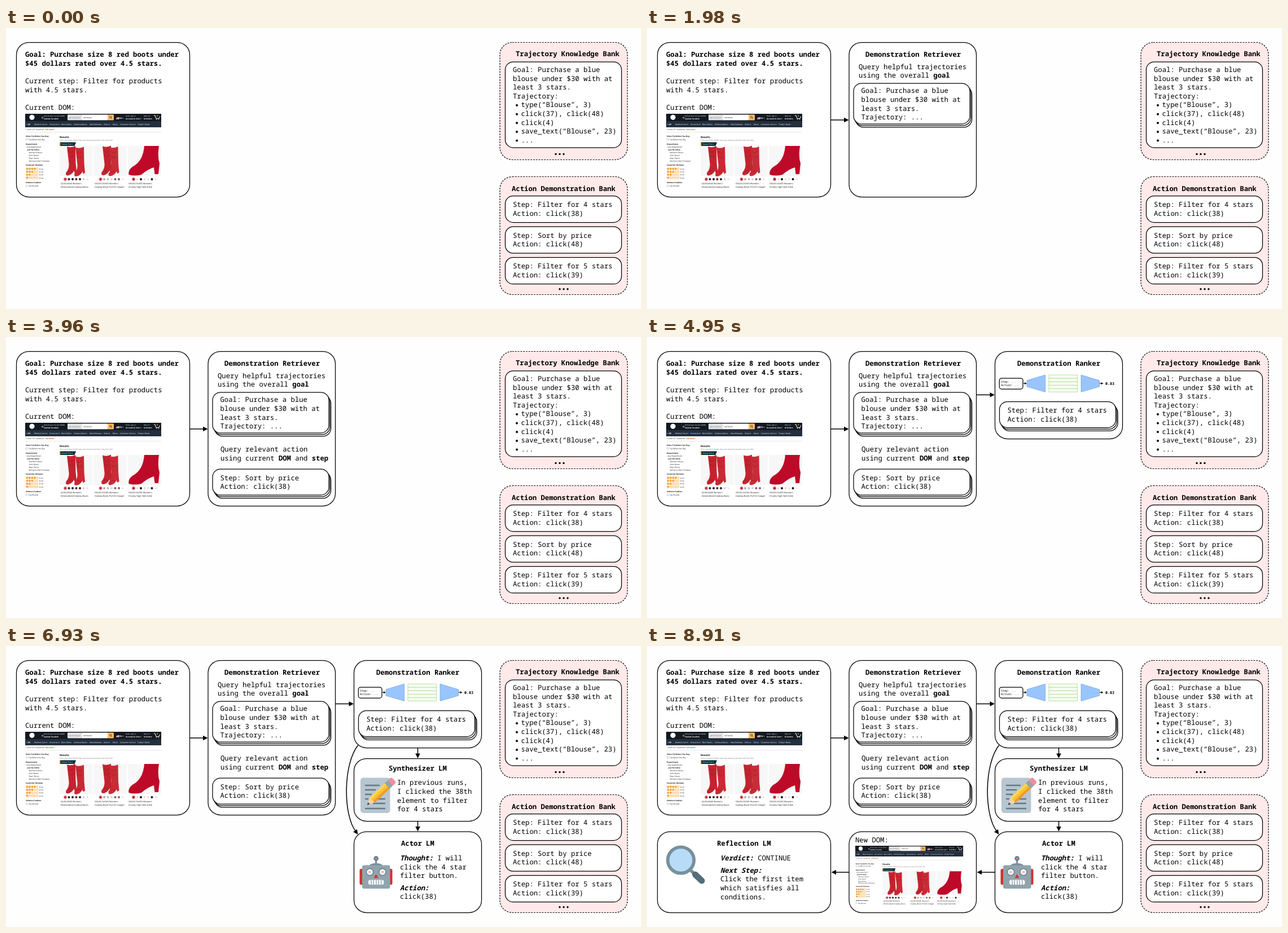
An HTML page that plays this animation: 1125 px wide and 498 px high, repeating every 9900 ms.

```html
<!DOCTYPE html>
<html lang="en">
<head>
<meta charset="utf-8">
<style>
  html, body { margin: 0; height: 100%; overflow: hidden; background: #fefefe; }
  svg { display: block; width: 100vw; height: 100vh; }
  text { font: 12.25px "Noto Sans Mono", monospace; white-space: pre; text-rendering: geometricPrecision; }
  .b { font-weight: 700; }
  .i { font-weight: 700; font-style: italic; }
  .shop text { font-family: "Open Sans", sans-serif; font-weight: 500; }
</style>
</head>
<body>
<svg id="stage" viewBox="0 0 1125 498"></svg>
<script>
const STEP = 990, STEPS = 10;
const LINE = 15.65;

// Shapes
const rect = (x, y, w, h, fill, r = 0, extra = '') =>
  `<rect x="${x}" y="${y}" width="${w}" height="${h}" rx="${r}" fill="${fill}" ${extra}/>`;
const circle = (x, y, r, fill, extra = '') =>
  `<circle cx="${x}" cy="${y}" r="${r}" fill="${fill}" ${extra}/>`;
const path = (d, fill = 'none', stroke = 'none', width = 1, extra = '') =>
  `<path d="${d}" fill="${fill}" stroke="${stroke}" stroke-width="${width}" ${extra}/>`;
const box = (x, y, right, bottom, r = 22) =>
  rect(x, y, right - x, bottom - y, '#fff', r, 'stroke="#000" stroke-width="1.25"');
const stack = (x, y, right, bottom) => [2, 1, 0].map(k =>
  box(x + k * 1.8, y + k * 2.9, right + k * 1.8, bottom + k * 2.9, 14)).join('');
const bank = (y, bottom) => rect(875, y, 226, bottom - y, '#ffe9e9', 22,
  'stroke="#000" stroke-width="1.2" stroke-dasharray="2.8 2"');
const dots = (x, y) => [-7, 0, 7].map(d => circle(x + d, y, 1.7, '#000')).join('');

// Text: y is the middle of the first line, | breaks lines, *bold*, ^bold italic^
const text = (x, y, s, size = 12.25, gap = LINE, attrs = '') => s.split('|').map((line, k) =>
  `<text x="${x}" y="${y + k * gap + size * .335}" style="font-size:${size}px" ${attrs}>` +
  line.replace(/\*(.+?)\*/g, '<tspan class="b">$1</tspan>')
      .replace(/\^(.+?)\^/g, '<tspan class="i">$1</tspan>') + '</text>').join('');

const arrowHead = (x, y, angle, size = 8.5) =>
  `<path d="M0 0L${-size} ${-size / 2}V${size / 2}Z" transform="translate(${x} ${y}) rotate(${angle})"/>`;
const arrow = (x1, y1, x2, y2, size = 8.5, width = 1.5) => {
  const a = Math.atan2(y2 - y1, x2 - x1);
  const ex = x2 - Math.cos(a) * size / 2, ey = y2 - Math.sin(a) * size / 2;
  return path(`M${x1} ${y1}L${ex} ${ey}`, 'none', '#000', width) +
    arrowHead(x2, y2, a * 180 / Math.PI, size);
};

// Shop page
function shopPage() {
  const small = (x, y, s, size = 3.4, color = '#111') => text(x, y, s, size, 6.3, `fill="${color}"`);
  const white = (x, y, s, size = 3.3) => small(x, y, s, size, '#fff');
  const check = y => rect(35.2, y, 3, 3, '#fff', .5, 'stroke="#888" stroke-width=".4"');
  const star = (x, y, on) => {
    let pts = '';
    for (let k = 0; k < 10; k++) {
      const r = k % 2 ? 1.1 : 2.4, a = (k / 5 - .5) * Math.PI;
      pts += `${x + r * Math.cos(a)},${y + r * Math.sin(a)} `;
    }
    return `<polygon points="${pts}" fill="${on ? '#f59a23' : '#fff'}" stroke="#f59a23" stroke-width=".5"/>`;
  };
  const boot = (x, y, color) =>
    `<g transform="translate(${x} ${y})">` +
    path('M0 1Q7 4 15 0L15.5 30L17 46L13.5 48L12.5 44Q8 52 1 52.5Q-3 52 -1.5 47Q4 41 3.5 32Z', color) +
    path('M3 8Q7 16 11 8M4 16Q8 24 12 16M2 46Q7 42 10 46', 'none', '#8e1420', .6) + '</g>';
  const swatches = (x, colors) => colors.map((c, k) => circle(x + k * 6.5, 268, 2, c)).join('') +
    circle(x, 268, 2.7, 'none', 'stroke="#c33" stroke-width=".6"') + small(x + 37, 268, '+9', 3, '#777');

  let s = rect(34, 152, 242.5, 134, '#fff') + rect(34, 152, 241, 13, '#131921') + rect(34, 165, 241, 11, '#232f3e');
  s += circle(46, 158.3, 4.6, '#fff');
  s += white(67, 156.4, 'Delivering to Corvale 00000', 2.9) + white(67, 160.6, '*Update location*', 3.3);
  s += circle(64.7, 159, 1.2, 'none', 'stroke="#fff" stroke-width=".6"');
  s += rect(109, 153.5, 27, 10, '#e3e3e3', 1) + small(111, 158.5, 'Just for Zelvo ▾', 3, '#555');
  s += rect(135, 153.5, 45, 10, '#fff') + small(137, 158.5, 'red boots');
  s += rect(180, 153.5, 11, 10, '#febd69', 1) + circle(185, 158, 1.7, 'none', 'stroke="#222" stroke-width=".7"') +
    path('M186.2 159.2l1.8 1.8', 'none', '#222', .8);
  s += rect(195, 158, 5.4, 3.6, '#fff') + path('M195 158.5h5.4M195 160h5.4M195 161.3h5.4', 'none', '#c33', .6) +
    rect(195, 158, 2.4, 1.9, '#33498a') + white(201, 159.8, '*EN* ▾');
  s += white(212, 156.4, 'Hello, sign in', 3) + white(212, 160.6, '*Account &amp; Lists* ▾', 3.3);
  s += white(244, 156.4, 'Returns', 3) + white(244, 160.6, '*&amp; Orders*', 3.3);
  s += path('M262 155h2l2 5.5h5l1.5-4', 'none', '#fff', 1) + circle(266.5, 162, .8, '#fff') +
    circle(270.5, 162, .8, '#fff') + small(267, 156, '*0*', 4, '#f59a23');

  const menu = [[36, '≡ *All*'], [50, 'Medical Care ▾'], [77, 'Groceries ▾'], [98, 'Best Sellers'],
    [120, 'Velmora Basics'], [148, 'New Releases'], [173, 'Zelvo ▾'], [189, 'Music'],
    [202, 'Customer Service'], [233, "Today's Deals"]];
  s += menu.map(([x, label]) => white(x, 170.5, label, 3.4)).join('');

  s += small(35, 180, '1-24 of 271 results for <tspan class="b" fill="#c45500">"red boots"</tspan>', 3.2);
  s += path('M34 184.5H275', 'none', '#ddd', .7);

  const side = [[35, 192, '*Zelvo Try Before You Buy*'], [40, 198, 'Try Before You Buy'], [35, 206, '*Department*'],
    [35, 211, '‹ Any Department'], [37.5, 216, '*Just for Zelvo*'], [40.5, 221, "Women's Boots"],
    [40.5, 226, "Girls' Boots"], [40.5, 231, "Boys' Boots"], [40.5, 235.7, "Women's Rain Footwear"],
    [35, 243.3, '*Customer Reviews*'], [35, 274, '*Velmora Fashion*'], [40, 280.2, 'Top Brands']];
  s += side.map(([x, y, label]) => small(x, y, label, 3.3)).join('') + check(196) + check(278.2);
  for (let row = 0; row < 4; row++) {
    const y = 249.6 + row * 5.3;
    for (let k = 0; k < 5; k++) s += star(37.4 + k * 4.5, y, k < 4 - row);
    s += small(59, y, '&amp; Up', 3);
  }

  s += small(95, 193.2, '*Results*', 4.6) +
    small(95, 199, 'Price and other details may vary based on product size and color', 3.15, '#666');
  s += [95, 155.3, 216].map(x => rect(x, 209, 58.5, 53.5, '#f7f7f7')).join('');
  s += path('M95 202.5H124L121.5 209H95Z', '#002f36') + rect(95, 202.5, 1.5, 6.5, '#f59a23') +
    white(98.5, 205.8, 'Overall Pick ▾', 3.2);
  s += boot(108, 209, '#c4222e') + boot(123, 210.5, '#cb2833') + boot(171, 208.5, '#c2242f') + boot(183.5, 210, '#c92c37');
  s += path('M245 209H271Q268 228 272 240L270 259H263.5L262 247Q250 251 240 260Q228 263 217.5 260Q216 252 224 246Q243 236 245 209Z', '#bd0a28');
  s += swatches(105, ['#b9243a', '#222', '#111', '#5a1a20', '#222', '#e6c8c8']);
  s += swatches(167.5, ['#c1121f', '#b5a7a0', '#bbb', '#ddd0dc', '#8a5a6a', '#9a5a50']);
  s += swatches(226, ['#b60a25', '#eee0d8', '#111', '#f0d8dc', '#e9e2ea', '#111']);
  s += small(97, 275.5, "QUOLVANE Women's|Embroidered Cowboy Boots", 3.75);
  s += small(157, 275.5, "OVLEN DUSKS Women's|Cowboy Boots Pull On Cowgirl", 3.75);
  s += small(217, 275.5, "OVLEN DUSKS Women's|Chunky High Heel Ankle", 3.75);
  return `<g id="shop" class="shop">${s}</g>`;
}

// Icons
const memo = () =>
  rect(628, 233.5, 52.5, 62.5, '#b7c6d0', 5) +
  path('M636 247h26M636 255h19M636 263h12M636 271h6M657 271h15M650 279h22M636 288h36', 'none', '#637884', 2.3) +
  '<g transform="translate(639.5 282) rotate(-43.5)">' +
  path('M0 0L14-6.5V6.5Z', '#f3d3a5') + path('M0 0L5-2.3V2.3Z', '#37474f') +
  rect(13, -6.5, 38, 4.4, '#ffd54f') + rect(13, -2.1, 38, 4.3, '#fbc02d') + rect(13, 2.2, 38, 4.3, '#f39c1f') +
  rect(55, -6.5, 10.5, 13, '#ef8f9d', 3.5) + rect(49.5, -6.5, 7.5, 13, '#90a4ae') + '</g>';

const robot = () =>
  rect(626.5, 395, 8, 28, '#d3302f', 2.5) + rect(676.5, 395, 8, 28, '#d3302f', 2.5) +
  rect(654, 378, 3.2, 10, '#78909c') + circle(655.6, 376.5, 4.3, '#607d8b') + circle(655.6, 376.5, 2, '#d98080') +
  path('M643 390Q645 385 655.6 385Q666 385 668 390Z', '#78909c') + rect(631, 388.5, 49.5, 41.5, '#90a4ae', 3.5) +
  [644.5, 667].map(x => circle(x, 400.5, 6, '#fff', 'stroke="#647984" stroke-width="1.4"') + circle(x, 400.5, 2.6, '#e5c6c6')).join('') +
  path('M655.6 404.5L659.6 411H651.6Z', '#d3302f') + rect(642, 414.5, 27.5, 8.5, '#fff', 3.5) +
  path('M647 414.5v8.5M651.4 414.5v8.5M655.8 414.5v8.5M660.2 414.5v8.5M664.6 414.5v8.5', 'none', '#78909c', 1.2);

const magnifier = () =>
  path('M76 396L84 404', 'none', '#78909c', 6) +
  path('M85.5 405L97 416', 'none', '#546e7a', 11, 'stroke-linecap="round"') +
  circle(60, 379.5, 23.2, '#b8dcf8', 'stroke="#78909c" stroke-width="5.8"');

const ranking = () => {
  const blue = d => path(d, '#99c5ff', '#6c9fd6', .7);
  let rows = '';
  for (let k = 0; k < 5; k++) rows += rect(712, 67.2 + k * 6.05, 50.5, 6.05, '#f8fff2', 0, 'stroke="#a9d893" stroke-width=".8"');
  return box(624.3, 73, 666, 92.3, 4) + text(627, 79.3, 'Step: ...|Action: ...', 5, 6.3) +
    arrow(666, 82.2, 673, 82.2, 4, .9) + blue('M673 77L705.5 67.2V97.5L673 88Z') + rows +
    blue('M769 67.2L801.5 77V88L769 97.5Z') + arrow(801.5, 82.2, 808.5, 82.2, 4, .9) + text(812, 82.5, '*0.83*', 6.7);
};

const actions = ['type(“Blouse”, 3)', 'click(37), click(48)', 'click(4)', 'save_text(“Blouse”, 23)', '...'];
const demos = ['Filter for 4 stars|Action: click(38)', 'Sort by price|Action: click(48)', 'Filter for 5 stars|Action: click(39)'];

// One entry per step; each stays visible until the loop restarts
const scenes = [
  box(18.5, 25.5, 325.5, 299.5) +
  text(34, 47, '*Goal: Purchase size 8 red boots under*|*$45 dollars rated over 4.5 stars.*||' +
    'Current step: Filter for products|with 4.5 stars.||Current DOM:') + shopPage() +
  bank(25.5, 233.5) + text(903, 46, '*Trajectory Knowledge Bank*') + box(884.5, 60, 1090.5, 212, 14) +
  text(898, 74, 'Goal: Purchase a blue|blouse under $30 with at|least 3 stars.|Trajectory:') +
  actions.map((a, k) => circle(905, 137 + k * LINE, 2, '#000') + text(912.5, 136.3 + k * LINE, a)).join('') + dots(981, 223.5) +
  bank(263.5, 472.5) + text(896, 285, '*Action Demonstration Bank*') +
  demos.map((d, k) => box(884.5, 297.5 + k * 54.6, 1090.5, 344.5 + k * 54.6, 14) +
    text(898, 313 + k * 54.6, 'Step: ' + d)).join('') + dots(988, 462.7),

  box(358, 25.5, 583.5, 299.5) + arrow(325.5, 163, 357.5, 163) + text(387, 47, '*Demonstration Retriever*') +
  text(375, 68.5, 'Query helpful trajectories|using the overall *goal*'),

  stack(366, 98, 572, 170) +
  text(379.5, 111.2, 'Goal: Purchase a blue|blouse under $30 with at|least 3 stars.|Trajectory: ...'),

  text(380, 199, 'Query relevant action|using current *DOM* and *step*'),

  stack(366, 234, 572, 280) + text(379.5, 249.7, 'Step: Sort by price|Action: click(38)'),

  box(616.5, 25.5, 842.5, 180.5) + arrow(583.5, 102.5, 616, 102.5) + text(656, 47, '*Demonstration Ranker*') +
  ranking() + stack(624.5, 114.5, 830.5, 160.5) + text(638.5, 130.3, 'Step: Filter for 4 stars|Action: click(38)'),

  box(616.5, 199.5, 842.5, 310.5) + arrow(729.5, 180.5, 729.5, 199) + text(678, 217, '*Synthesizer LM*') + memo() +
  text(693, 242.3, 'In previous runs,|I clicked the 38th|element to filter|for 4 stars'),

  box(616.5, 329, 842.5, 472.5) + arrow(729.5, 310.5, 729.5, 328.5) +
  path('M623.5 176C597 210 597 300 620 329', 'none', '#000', 1.5) + arrowHead(623.5, 334, 54) +
  text(700, 349.5, '*Actor LM*') + robot() +
  text(698, 376, '^Thought:^ I will|click the 4 star|filter button.') + text(698, 428.7, '^Action:^|click(38)'),

  box(358, 329, 583.5, 472.5) + arrow(616.5, 401, 584.5, 401) + text(369, 344, 'New DOM:') +
  '<use href="#shop" transform="translate(369 354) scale(.793) translate(-34 -152)"/>',

  box(18.5, 329, 325.5, 472.5) + arrow(358, 401, 326.5, 401) + text(124, 349.5, '*Reflection LM*') + magnifier() +
  text(130, 376, '^Verdict:^ CONTINUE') +
  text(130, 397.5, '^Next Step:^|Click the first item|which satisfies all|conditions.')
];

const stage = document.getElementById('stage');
stage.innerHTML = scenes.map(s => `<g>${s}</g>`).join('');
const groups = [...stage.children];

function draw() {
  const step = Math.floor(performance.now() / STEP) % STEPS;
  groups.forEach((g, k) => g.setAttribute('visibility', k <= step ? 'visible' : 'hidden'));
  requestAnimationFrame(draw);
}
draw();
</script>
</body>
</html>
```
